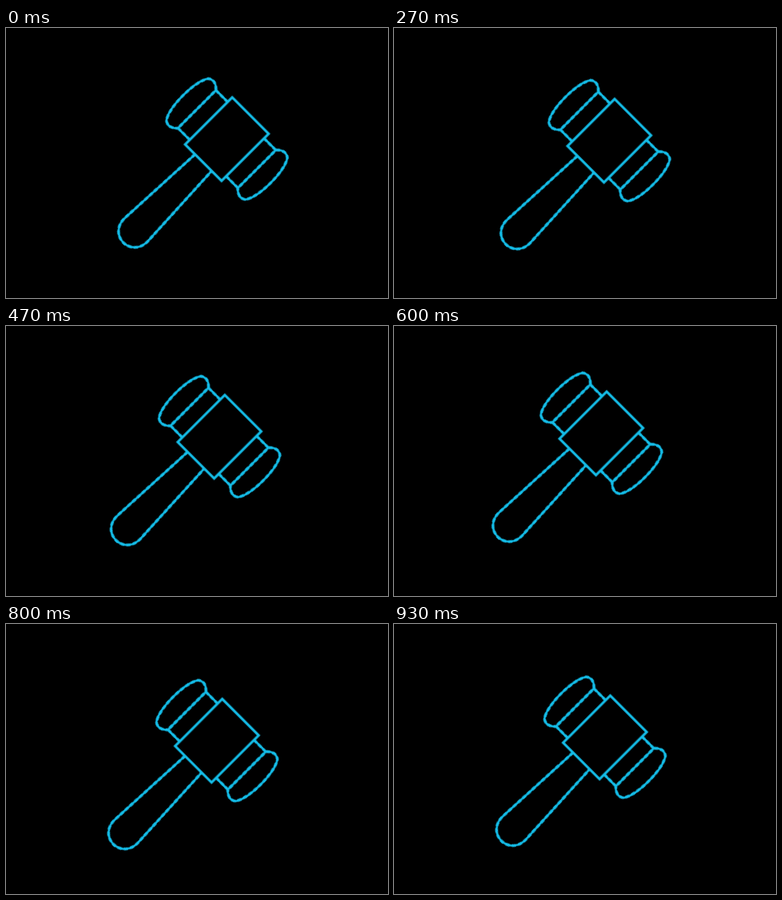
Animation of 478 by 338 pixels, one loop 990 ms. Source, as an HTML page:

```html
<!DOCTYPE html>
<html lang="en">
<head>
<meta charset="utf-8">
<title>Gavel</title>
<style>
  html, body { margin: 0; width: 100%; height: 100%; overflow: hidden; background: #000; }
  svg { display: block; width: 478px; height: 338px; }
  #gavel { fill: none; stroke: #14bde8; stroke-width: 3.1; }
  .rough { stroke-width: 2.6; }
  .grain { stroke-width: 3.5; stroke-dasharray: 5 3; }
</style>
</head>
<body>
<svg viewBox="0 0 478 338">
  <defs>
    <g id="end">
      <path d="M-32 -33.6H-53V33.6H-32"/>
      <path d="M-53 -33.6C-58.5 -40 -65.5 -41 -70 -37C-80 -23 -80 23 -70 37C-65.5 41 -58.5 40 -53 33.6"/>
    </g>
    <g id="outline">
      <use href="#end"/>
      <use href="#end" transform="scale(-1 1)"/>
      <path d="M-14.7 41.7L-20.3 157C-24 192 24 192 20.3 157L14.7 41.7"/>
    </g>
  </defs>
  <g id="gavel">
    <g transform="translate(276.4 139.1) rotate(45)">
      <use href="#outline" class="rough"/>
      <use href="#outline" class="grain"/>
      <rect x="-32.2" y="-41.7" width="64.4" height="83.4"/>
    </g>
  </g>
</svg>
<script>
  const LOOP = 990, STEPS = 15;

  // Turning points of the shake: step, x, y
  const turns = [
    [0, 0, 0], [2, -19, -5], [4, -7, 2], [6, -21, 7], [7, -9.3, -0.5],
    [9, -17, -4.7], [10, -19.5, -3], [12, -12.5, 7], [14, -12.5, 2.8]
  ];

  function pose(step) {
    const i = Math.max(1, turns.findIndex(turn => turn[0] >= step));
    const [s0, x0, y0] = turns[i - 1], [s1, x1, y1] = turns[i];
    const k = (step - s0) / (s1 - s0);
    return `translate(${x0 + (x1 - x0) * k}px, ${y0 + (y1 - y0) * k}px)`;
  }

  // 15 poses a second, held, with times rounded to 10 ms
  const frames = Array.from({ length: STEPS }, (_, step) => ({
    offset: Math.round(step * 100 / STEPS) * 10 / LOOP,
    transform: pose(step),
    easing: 'steps(1, end)'
  }));
  frames.push({ offset: 1, transform: pose(STEPS - 1) });

  document.getElementById('gavel').animate(frames, { duration: LOOP, iterations: Infinity });
</script>
</body>
</html>
```
